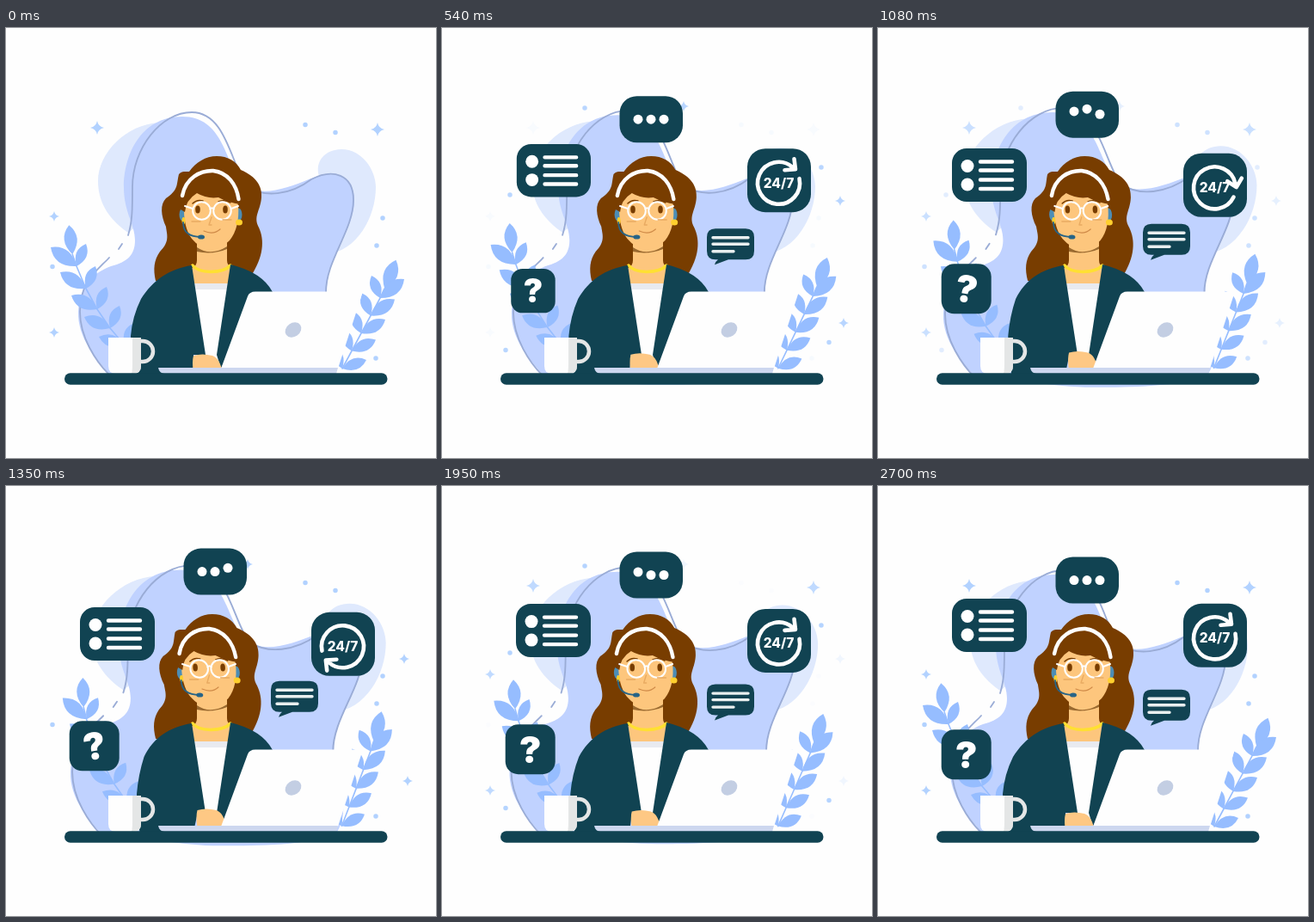
An HTML page for the animation above (2.73 s loop, 500x500 px).

```html
<!DOCTYPE html>
<html lang="en">
<head>
<meta charset="utf-8">
<title>Customer support</title>
<style>
  html, body { margin: 0; height: 100%; overflow: hidden; background: #fefefe; }
  svg { display: block; width: 100vw; height: 100vh; }
  text { font-family: Inter, "Open Sans", sans-serif; text-anchor: middle; fill: #fff; }
  .line { fill: none; stroke-linecap: round; stroke-linejoin: round; }
  .dark { fill: #114352; }
  .skin { fill: #fdc67d; }
  .hair { fill: #783d00; }
  .leaf { fill: #96bdff; stroke: #96bdff; }
  .bubble { transform-box: fill-box; }
</style>
</head>
<body>
<svg viewBox="0 0 500 500">
  <g id="backdrop">
    <path d="M178 110C140 112 107 145 107 178C107 205 122 224 142 238L190 200Z
      M365 175C357 155 372 141 390 141C414 141 430 165 430 185C430 220 408 260 372 263Z" fill="#dfe9fd"/>
    <path d="M137 185C137 150 155 103 205 103C252 103 255 155 272 177C290 200 325 187 352 176
      C385 162 405 175 405 200C405 235 373 265 373 305C373 340 395 370 375 400C345 412 290 413 250 413
      C200 413 170 402 120 402C105 385 83 360 84 330C86 295 105 284 122 277C142 272 150 263 150 247
      C150 228 137 215 137 185Z" fill="#c0d2ff"/>
    <path class="line" d="M372 307C372 270 404 235 404 200C404 170 380 163 355 176C330 195 300 197 282 185
      C262 165 258 98 216 98C180 98 147 140 147 185C147 210 147 225 142 241M135 251L131 257
      M120 267C105 283 86 295 86 330C86 360 105 388 119 402" stroke="#9aacd6" stroke-width="1.8"/>
  </g>
  <g id="starsA" fill="#b2d2ff"></g>
  <g id="starsB" fill="#b2d2ff"></g>
  <g class="line" stroke="#b2d2ff" stroke-width="5.500">
    <path id="specksA" d="M348 112.500h0M383 121.500h0M438 221h0M431 253h0M430 384h0M54 277.500h0"/>
    <path id="specksB" d="M166 93h0M441 162h0M450 365.500h0M79 194h0M74 374.500h0"/>
  </g>
  <g id="plantLeft" class="leaf"></g>
  <g id="plantRight" class="leaf"></g>

  <path class="hair" id="hair" d="M245 149C258 149 268 155 273 165C292 173 298 185 297 197C296 212 288 218 293 230
    C300 243 301 262 287 285L235 297L174 294C171 280 172 270 179 260C191 248 187 240 186 231C180 218 179 205 186 198
    C201 188 198 182 201 170C204 166 209 167 213 167C221 156 232 149 245 149Z"/>
  <path class="skin" d="M222 240V270Q222 277 216 279L218 300H260L262 278Q257 276 257 270V240Z"/>
  <path d="M222 255Q238 266 257 254V257Q240 264 222 260Z" fill="#99692f"/>
  <path class="line" d="M217 276Q222 283 238 283.500Q255 283 261 276" stroke="#ffe032" stroke-width="3.500"/>
  <path d="M217 297H260L250 396H230Z" fill="#fefefe"/>
  <path d="M217 297H260V304H218Z" fill="#e8eaf0"/>
  <path id="jacket" class="dark"/>

  <g id="face">
    <g fill="#4c8db5">
      <ellipse cx="205.500" cy="217" rx="4" ry="7.500"/><ellipse cx="270.500" cy="217" rx="4" ry="7.500"/>
    </g>
    <path class="skin" d="M207 205Q214 187 240 184Q266 187 270 206Q272 232 260 247Q249 258 238 258Q226 257 216 245Q206 232 207 205Z"/>
    <path class="hair" d="M203 211C203 181 219 170 240 169C260 170 270 184 273 205Q258 203 247 197Q234 199 222 192Q209 200 208 214Z"/>
    <path class="line" d="M205 195C209 174 226 165.500 241 166C258 168 268 182 270.500 199" stroke="#fefefe" stroke-width="4.400"/>
    <path class="line" d="M217 204Q222 199 229 201M247 202Q254 199 261 203" stroke="#783d00" stroke-width="1.500"/>
    <g class="hair"><ellipse cx="223" cy="211" rx="2.800" ry="4.500"/><ellipse cx="255" cy="211" rx="2.800" ry="4.500"/></g>
    <g class="line" stroke="#fefefe" stroke-width="2">
      <circle cx="227.500" cy="212.500" r="10.300"/><circle cx="251.500" cy="212.500" r="10.300"/>
      <path d="M237.500 210.500Q239.500 208 241.500 210.500M217 210L208 207M262 210L270 207"/>
    </g>
    <path class="line" d="M216 225H226M252 223H262M239 220L236 229H239" stroke="#e9ab62" stroke-width="1.400"/>
    <path class="line" d="M230 236Q241 241 249 234" stroke="#cf8a48" stroke-width="1.200"/>
    <g fill="#ffcf2e"><ellipse cx="206.500" cy="224" rx="2" ry="4"/><ellipse cx="271" cy="226" rx="4" ry="3.500"/></g>
    <path class="line" d="M206 226C206 238 213 243 227 243" stroke="#276487" stroke-width="1.800"/>
    <ellipse cx="227" cy="243" rx="4" ry="2.600" fill="#276487"/>
  </g>

  <path id="hand" fill="#fec884" d="M218 381Q228 378 240 381Q249 384 252 402H218Q216 388 218 381Z"/>
  <path d="M290 306.500H415L386 396H250L281 312Q283 306.500 290 306.500Z" fill="#fefefe"/>
  <ellipse cx="334" cy="351" rx="10" ry="8" transform="rotate(-35 334 351)" fill="#c3cee3"/>
  <path d="M177 395H386L384 402H184Q178 401 177 395Z" fill="#cdd7ef"/>
  <path class="line" d="M157 364h2A12 12 0 0 1 159 388h-2" stroke="#e4e6e6" stroke-width="4.500"/>
  <path d="M119 360H157V393Q157 402 148 402H128Q119 402 119 393Z" fill="#fefefe"/>
  <path d="M147 360H157V393Q157 402 146 402Q147 398 147 390Z" fill="#e4e6e6"/>
  <rect class="dark" x="68" y="401.300" width="375.500" height="13.400" rx="6.700"/>

  <!-- Bubbles in the order in which they pop up; the odd ones rise, the even ones sink. -->
  <g transform="translate(308 236.700)">
    <g class="bubble" data-float="-10" style="transform-origin: left bottom">
      <path class="dark" d="M10 0H45Q55 0 55 10V26Q55 36 45 36H25L9 42Q10 38 13 36H10Q0 36 0 26V10Q0 0 10 0Z"/>
      <path class="line" d="M7 10.500H48M7 18H48M7 26.500H31" stroke="#e9efef" stroke-width="3.400"/>
    </g>
  </g>
  <g transform="translate(355 136.800)">
    <g class="bubble" data-float="10" style="transform-origin: left bottom">
      <rect class="dark" width="74" height="74" rx="21"/>
      <path id="arrow" class="line" d="M24 -5A24.500 24.500 0 1 1 16 -18.500M18 -28L19.500 -16L7 -15" stroke="#fff" stroke-width="4.600"/>
      <text x="36.500" y="45.500" font-size="15.500" font-weight="800">24/7</text>
    </g>
  </g>
  <g transform="translate(206.500 82.600)">
    <g class="bubble" data-float="-10" style="transform-origin: center bottom">
      <rect class="dark" width="73.500" height="54" rx="20"/>
      <g id="dots" fill="#fff"><circle cx="21.500" r="5.500"/><circle cx="36.500" r="5.500"/><circle cx="51.500" r="5.500"/></g>
    </g>
  </g>
  <g transform="translate(86 131)">
    <g class="bubble" data-float="10" style="transform-origin: right bottom">
      <rect class="dark" width="87" height="62" rx="17"/>
      <g fill="#fff"><circle cx="18" cy="20.500" r="7.500"/><circle cx="18" cy="42" r="7.500"/></g>
      <path class="line" d="M33 15.500H70M33 25.500H70M33 36.500H70M33 47H70" stroke="#fff" stroke-width="4.400"/>
    </g>
  </g>
  <g transform="translate(73.700 283.300)">
    <g class="bubble" data-float="-10" style="transform-origin: right top">
      <rect class="dark" width="58" height="58" rx="15"/>
      <text id="mark" x="29" y="44.500" font-size="43" font-weight="900">?</text>
    </g>
  </g>
</svg>
<script>
const LOOP = 2730;
const $ = id => document.getElementById(id);
const clamp = v => Math.min(1, Math.max(0, v));
const wave = turns => (1 - Math.cos(2 * Math.PI * turns)) / 2;
const set = (id, name, value) => $(id).setAttribute(name, value);

function leaf([x, y], dx, dy) {
  const side = k => `${x + dx * .55 - dy * k},${y + dy * .55 + dx * k}`;
  return `<path stroke="none" d="M${x},${y}Q${side(.44)} ${x + dx},${y + dy}Q${side(-.44)} ${x},${y}Z"/>`;
}

// A stem with pairs of leaves; the outer leaf lies flatter further down.
function plant(id, pairs, node, outer, inner) {
  const nodes = Array.from({ length: pairs }, (_, i) => node(i));
  const top = node(-.5);
  const leaves = nodes.map((n, i) => leaf(n, outer, -22 + 3 * i) + leaf(n, inner, -26));
  $(id).innerHTML = `<path class="line" stroke-width="1.6" d="M${[top, ...nodes].join('L')}"/>` +
    leaf(top, inner < 0 ? 13 : -4, -34) + leaves.join('');
}
plant('plantLeft', 5, i => [82 + 10 * i + i * i, 277 + 27 * i - i * i], -30, 11);
plant('plantRight', 5, i => [435 - 11 * i, 314 + 20.5 * i], 28, -10);

const star = ([x, y, r]) =>
  `<path transform="translate(${x} ${y}) scale(${r})" d="M0-1Q.16-.16 1 0Q.16 .16 0 1Q-.16 .16-1 0Q-.16-.16 0-1Z"/>`;
$('starsA').innerHTML = [[106, 116, 8], [432, 118, 8], [56, 219, 6], [56, 354, 6]].map(star).join('');
$('starsB').innerHTML = [[281, 91, 6], [463, 201, 6], [467, 343, 6]].map(star).join('');

const bubbles = [...document.querySelectorAll('.bubble')];
const dots = [...$('dots').children];

function draw(t) {
  const sway = wave(t / LOOP);

  set('backdrop', 'transform', `translate(235 260) scale(${1 + .06 * sway} ${1 + .035 * sway}) translate(-235 -260)`);
  set('plantLeft', 'transform', `rotate(${5.3 * sway} 150 400)`);
  set('plantRight', 'transform', `rotate(${-7.2 * sway} 385 400)`);

  const starFade = wave(3 * t / LOOP), speckFade = wave(2 * t / LOOP);
  set('starsA', 'opacity', 1 - starFade);
  set('starsB', 'opacity', starFade);
  set('specksA', 'opacity', 1 - speckFade);
  set('specksB', 'opacity', speckFade);

  // The head leans from the shoulders while the arm slides in.
  const lean = `translate(0 290) skewX(${2.1 * sway}) translate(0 -290)`;
  set('hair', 'transform', lean);
  set('face', 'transform', lean);
  const arm = 7 * sway;
  set('jacket', 'd', `M216 276C190 280 171 293 ${157 + arm * .5} 315Q${147 + arm} 335 ${145 + arm} 358` +
    `Q${145 + arm} 385 ${152 + arm * .5} 402H218L${218 + arm * .7} 380H232ZM261 275Q298 284 310 307H290L250 396L245 380Z`);
  set('hand', 'transform', `translate(${4.5 * sway} ${-4 * sway})`);

  bubbles.forEach((bubble, i) => {
    const size = wave(clamp((t - 60 * i) / 385) / 2);
    bubble.style.transform = `translateY(${bubble.dataset.float * sway}px) scale(${size})`;
  });
  dots.forEach((dot, i) => {
    const hop = start => wave(clamp((t - start - 140 * i) / 420));
    dot.setAttribute('cy', 27 - 7 * (hop(770) + hop(1846)));
  });
  const turn = clamp((t - 900) / 900);
  set('arrow', 'transform', `translate(36.5 40) rotate(${360 * turn * turn * (3 - 2 * turn)})`);
  set('mark', 'transform', `rotate(${10 * Math.sin(2 * Math.PI * clamp((t - 900) / 600))} 29 29)`);
}

function frame() {
  draw(performance.now() % LOOP);
  requestAnimationFrame(frame);
}
frame();
</script>
</body>
</html>
```
